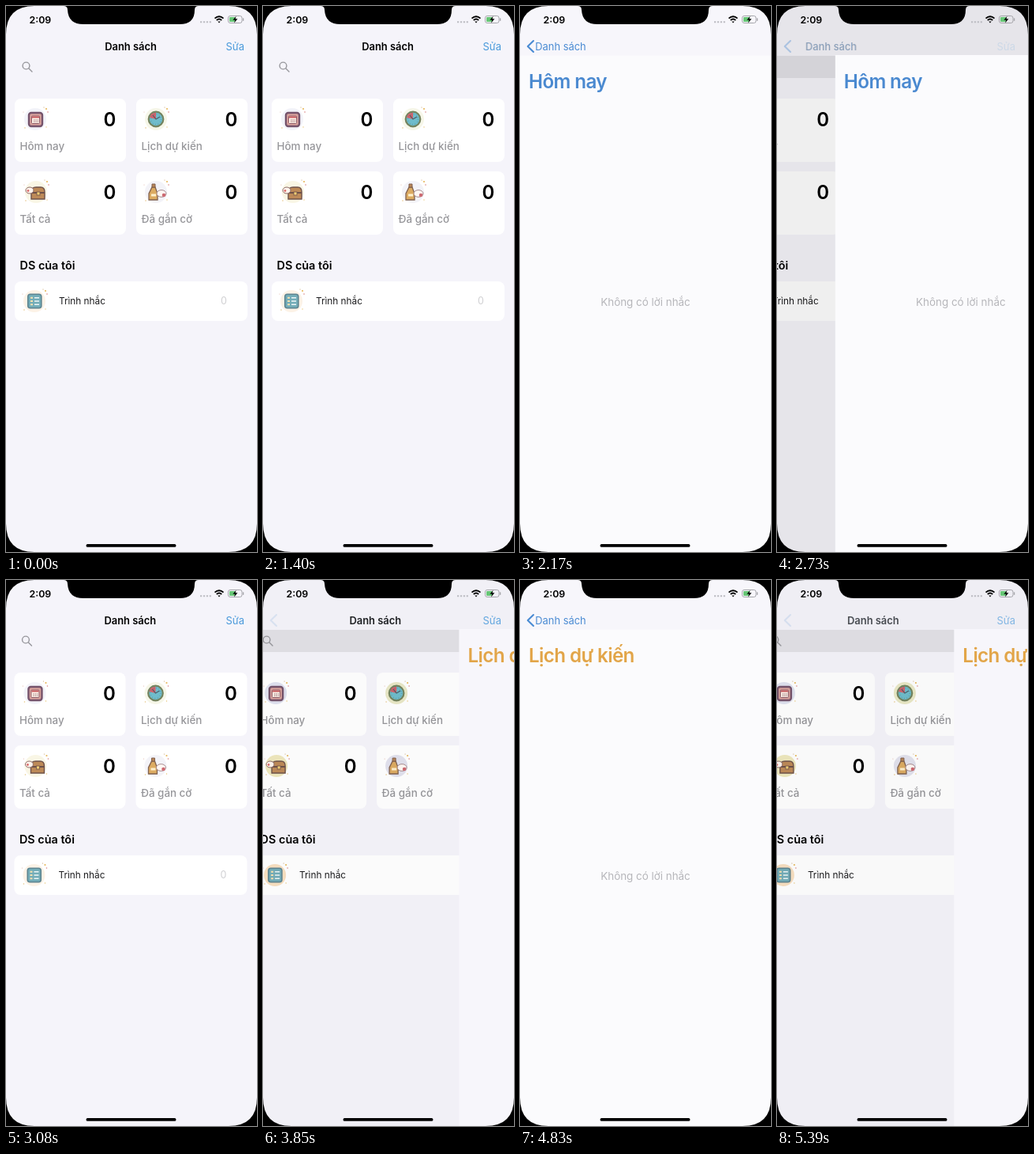
These frames come from a looping animation (318 px wide and 690 px high, 5.46 s). An HTML page:

```html
<!DOCTYPE html>
<html lang="vi">
<head>
<meta charset="utf-8">
<style>
html, body { margin: 0; width: 100%; height: 100%; overflow: hidden; background: #000; }
svg { display: block; width: 100vw; height: 100vh; }
text { font-family: Inter, Roboto, sans-serif; white-space: pre; }
.card { fill: #fff; }
.label { font-size: 13.4px; font-weight: 500; fill: #96969a; }
.count { font-size: 24px; font-weight: 600; text-anchor: middle; }
.bar { font-size: 12.9px; }
.mid { text-anchor: middle; }
.large { font-size: 24.2px; font-weight: 600; letter-spacing: -.6px; }
</style>
</head>
<body>
<svg viewBox="0 0 318 690">
  <rect width="318" height="690" fill="#f5f4fa"/>
  <g id="list">
    <rect id="field" x="11" y="63" width="295" height="28" fill="#e2e1e6"/>
    <g fill="none" stroke="#97979c" stroke-width="1.4" stroke-linecap="round">
      <circle cx="25.5" cy="75.5" r="4.4"/><path d="M29 79l4 4"/>
    </g>
    <g id="tiles"></g>
    <text x="17.5" y="333" font-size="14.4" font-weight="600">DS của tôi</text>
    <rect class="card" x="11" y="348" width="295" height="50" rx="8"/>
    <text x="67" y="377" font-size="11.8" fill="#1c1c1e">Trình nhắc</text>
    <text x="276" y="377" font-size="12.5" class="mid" fill="#d0d0d3">0</text>
    <g id="icons">
      <g transform="translate(37 143)">
        <circle class="halo" r="14" fill="#dfe2f0"/>
        <rect x="-8" y="-8" width="17" height="17" rx="3" fill="#d9a29c" stroke="#75536b" stroke-width="2.4"/>
        <rect x="-4.5" y="-4" width="10" height="9.5" rx="1" fill="#fff3e8" stroke="#8d5a67"/>
        <path d="M-4-2.5H5" stroke="#c9585c" stroke-width="2"/>
        <path d="M-2 1H4M-2 3.2H4" stroke="#8d5a67" stroke-dasharray="1.4 1"/>
      </g>
      <g transform="translate(190 143)">
        <circle class="halo" r="14" fill="#e9e8c6"/>
        <circle r="9.3" fill="#6fbccb" stroke="#73835f" stroke-width="2.2"/>
        <path d="M0 0L-8-2A8.3 8.3 0 0 1 0-8.3Z" fill="#d3616a"/>
        <path d="M-4-5L0 0L5-3" fill="none" stroke="#4a5e68" stroke-width="1.2"/>
        <circle r="6.6" fill="none" stroke="#4c8795" stroke-dasharray=".8 2.7"/>
      </g>
      <g transform="translate(38 235)">
        <circle class="halo" r="14" fill="#efe8bd"/>
        <path d="M-6 0Q-6-6 0-6H6Q11-6 11 0V9H-6Z" fill="#bd8a58" stroke="#6e5149" stroke-width="1.4"/>
        <path d="M-6 1H11" stroke="#6e5149" stroke-width="2"/>
        <rect x="1" y="0" width="4" height="4" fill="#f0ce74" stroke="#6e5149" stroke-width=".8"/>
        <ellipse cx="-8" cy="-2" rx="5" ry="4" fill="#fff5ee" stroke="#8c6a67"/>
        <circle cx="-10" cy="-1.5" r="1.4" fill="#d96a6a"/>
      </g>
      <g transform="translate(190 235)">
        <circle class="halo" r="14" fill="#e2e2ee"/>
        <path d="M-5-6L-1-6L2 2V10H-9V2Z" fill="#dcab62" stroke="#80614e" stroke-width="1.3"/>
        <path d="M-5-10H-1V-6H-5Z" fill="#b98657" stroke="#80614e"/>
        <path d="M-6 4H0" stroke="#fff0cd" stroke-width="3"/>
        <ellipse cx="7" cy="2" rx="6" ry="4.4" fill="#fff7f3" stroke="#a58a8e"/>
        <circle cx="10" cy="4" r="2.3" fill="#cd6a72"/>
      </g>
      <g transform="translate(36 373)">
        <circle class="halo" r="14" fill="#f8dfc0"/>
        <rect x="-8.2" y="-8.7" width="17" height="17.4" rx="3" fill="#74adb8" stroke="#5d8490" stroke-width="1.6"/>
        <path d="M-5-4.2H-2M-5 0H-2M-5 4.2H-2" stroke="#f5e1b0" stroke-width="2"/>
        <path d="M0-4.2H6M0 0H6M0 4.2H6" stroke="#eef7f7" stroke-width="1.6"/>
      </g>
    </g>
  </g>
  <rect id="dim" width="318" height="690"/>
  <g id="panel">
    <rect id="sheet" y="62" width="318" height="628"/>
    <text id="heading" class="large" x="11" y="103.5"></text>
    <text class="mid" x="159" y="379" font-size="13.4" fill="#b6b6ba">Không có lời nhắc</text>
  </g>
  <rect id="navFill" width="318" height="62.5" fill="#f7f6fb"/>
  <path id="chevron" d="M17 44L9.8 51L17 58" fill="none" stroke="#4a8bd3" stroke-width="2.1" stroke-linecap="round" stroke-linejoin="round"/>
  <text id="back" class="bar mid" y="55.5" fill="#4a8bd3">Danh sách</text>
  <text id="title" class="bar mid" y="55.5" font-weight="600">Danh sách</text>
  <text id="edit" class="bar" x="302" y="55.5" text-anchor="end" fill="#4a9adb">Sửa</text>

  <text x="29.5" y="21.5" font-size="12.4" font-weight="600">2:09</text>
  <path d="M246 20.2H260" stroke="#bcbcc2" stroke-width="2" stroke-dasharray="2.2 1.7"/>
  <g fill="none" stroke="#000" stroke-width="1.9">
    <path d="M264.5 15.6Q270 10.8 275.5 15.6M266.8 18Q270 15.2 273.2 18"/>
    <path d="M268.3 19.4H271.7L270 21.4Z" fill="#000" stroke="none"/>
  </g>
  <rect x="281.5" y="12.5" width="17.5" height="9" rx="2.6" fill="none" stroke="#a5a5aa"/>
  <rect x="283" y="14" width="7.5" height="6" rx="1.2" fill="#67c776"/>
  <path d="M300.6 15.4V18.8" stroke="#a5a5aa" stroke-width="1.3"/>
  <path d="M291.6 12.7L287.4 17.7H290.2L289 21.5L293.4 16.3H290.5Z"/>
  <rect x="101.5" y="680" width="114" height="3.8" rx="1.9"/>
  <path d="M73 0Q78 0 78 5Q79 23 98 23H220Q239 23 239 5Q239 0 244 0Z"/>
  <path fill-rule="evenodd" d="M0 0H318V690H0ZM36 0Q0 0 0 36V654Q0 690 36 690H282Q318 690 318 654V36Q318 0 282 0Z"/>
</svg>
<script>
const LOOP = 5460, STEP = 70, W = 318, SETTLE = 510;
const OMEGA = Math.sqrt(1000 / 3) / 1000;
const TITLE_LAG = 11;
const screens = [
  { name: 'Hôm nay', color: '#4a89d0' },
  { name: 'Lịch dự kiến', color: '#e2a548' }
];
const moves = [
  { at: 1445, open: true, screen: 0 },
  { at: 2680, open: false, screen: 0, press: 2590 },
  { at: 3802, open: true, screen: 1 },
  { at: 5255, open: false, screen: 1, press: 5180 }
];
const $ = id => document.getElementById(id);
const set = (id, attrs) => {
  for (const k in attrs) $(id).setAttribute(k, attrs[k]);
};

$('tiles').innerHTML = ['Hôm nay', 'Lịch dự kiến', 'Tất cả', 'Đã gắn cờ'].map((name, i) => {
  const x = 11 + (i % 2) * 154, y = 117 + (i >> 1) * 92;
  return `<rect class="card" x="${x}" y="${y}" width="141" height="80" rx="8"/>
    <text class="label" x="${x + 6.5}" y="${y + 65}">${name}</text>
    <text class="count" x="${x + 120.5}" y="${y + 35}">0</text>`;
}).join('');

// Small confetti around every icon
const dots = [[14, -13, 1.1, '#e8b85c'], [16, -9, .8, '#d98080'], [11, -15, .6, '#c7a06a'],
  [-13, 11, .8, '#e6c583'], [-15, -9, .6, '#e3b7a8'], [14, 10, .7, '#e8c576']];
for (const icon of $('icons').children) {
  icon.innerHTML += dots.map(([x, y, r, c]) => `<circle cx="${x}" cy="${y}" r="${r}" fill="${c}"/>`).join('');
}
const halos = document.querySelectorAll('.halo');

// Critically damped spring from 0 to 1
function spring(ms) {
  if (ms <= 0) return 0;
  if (ms >= SETTLE) return 1;
  return 1 - (1 + OMEGA * ms) * Math.exp(-OMEGA * ms);
}

function render(t) {
  const move = moves.filter(m => t >= m.at).pop();
  const progress = lag => {
    if (!move) return 0;
    const s = spring(t - move.at - lag);
    return move.open ? s : 1 - s;
  };
  const p = progress(0), q = progress(TITLE_LAG);
  const x = W * (1 - p);
  const settled = p === 1 && move.open;
  const screen = screens[move ? move.screen : 0];
  const pressed = moves.some(m => t >= m.press && t < m.at + SETTLE);
  const popping = move && !move.open;
  const tint = Math.min(1, Math.max(0, (x - 80) / 140));

  set('list', { transform: `translate(${-.3 * W * p} 0)` });
  set('field', { opacity: p > .02 ? 1 : 0 });
  halos.forEach(h => h.setAttribute('opacity', p > .02 ? 1 : .4));
  set('dim', { opacity: .08 * p });
  set('panel', { transform: `translate(${x} 0)`, visibility: p > 0 ? 'visible' : 'hidden' });
  set('sheet', { fill: `rgb(${251 - 4 * tint},${251 - 5 * tint},${253 - 2 * tint})` });
  set('heading', { fill: screen.color });
  $('heading').textContent = screen.name;
  set('navFill', { opacity: settled ? 1 : 0 });

  const cx = 158 - 106.5 * q;
  set('chevron', { opacity: q * (pressed ? .45 : 1) });
  set('back', { x: cx, opacity: q * (popping ? .5 : 1) });
  set('title', { x: cx, opacity: 1 - q });
  set('edit', { opacity: 1 - q });
}

function tick(now) {
  render(Math.floor(now % LOOP / STEP) * STEP);
  requestAnimationFrame(tick);
}
render(0);
requestAnimationFrame(tick);
</script>
</body>
</html>
```
